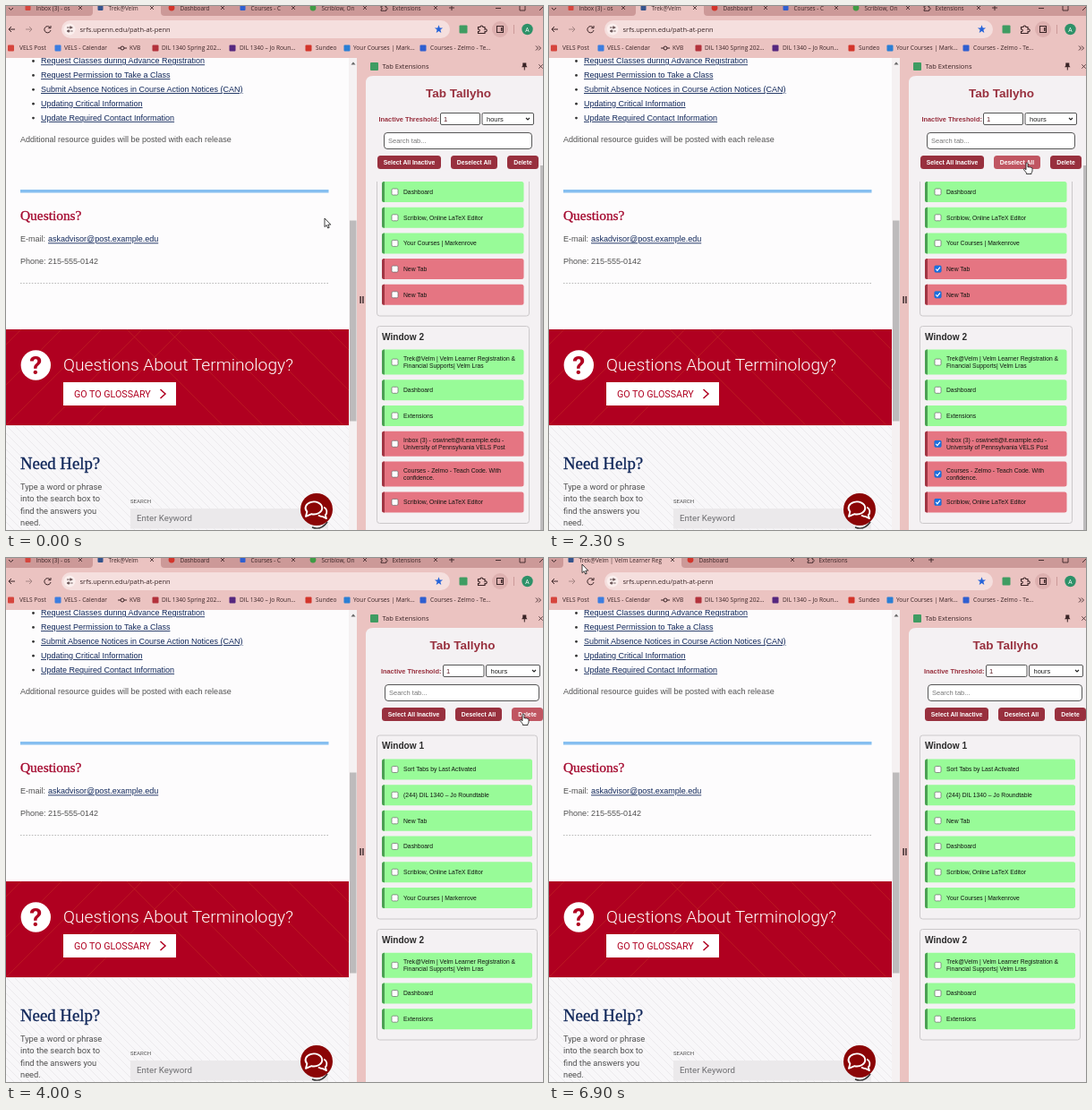
An HTML page that plays this animation: 600 by 585 pixels, repeating every 7000 ms.

```html
<!DOCTYPE html>
<html lang="en">
<head>
<meta charset="utf-8">
<title>Tab manager demo</title>
<style>
  html, body { margin: 0; width: 100%; height: 100%; overflow: hidden; background: #ebc3c1; }
  svg { display: block; width: 100%; height: 100%; }
  text { font-family: "Liberation Sans", Arial, sans-serif; white-space: pre; fill: currentColor; }
  .ui { font-family: "Open Sans", "Noto Sans", sans-serif; }
  .site { font-family: Roboto, sans-serif; }
  .light { font-weight: 300; }
  .serif { font-family: "Liberation Serif", Times, serif; stroke: currentColor; stroke-width: .3; }
  .b { font-weight: 700; }
  .mid { text-anchor: middle; }
  .link { text-decoration: underline; }
</style>
</head>
<body>
<svg id="stage" viewBox="0 0 600 585"></svg>
<script>
const LOOP = 7000, STEP = 100;
const PINK = '#ebc3c1', INK = '#3a2426', RED = '#b00020', WINE = '#98303e', HOVER = '#c05662';
const GREEN = '#98fb98', ROSE = '#e57582', NAVY = '#10275a', GREY = '#505050';

const rect = (x, y, w, h, fill, more = '') =>
  `<rect x="${x}" y="${y}" width="${w}" height="${h}" fill="${fill}" ${more}/>`;
const text = (x, y, size, str, color, cls = '') =>
  `<text x="${x}" y="${y}" font-size="${size}" color="${color}" class="${cls}">${str}</text>`;
const dot = (x, y, r, fill, more = '') =>
  `<circle cx="${x}" cy="${y}" r="${r}" fill="${fill}" ${more}/>`;
const line = (d, stroke, w = 1, more = '') =>
  `<path d="${d}" fill="none" stroke="${stroke}" stroke-width="${w}" ${more}/>`;
const square = (x, y, s, fill) => rect(x - s / 2, y - s / 2, s, s, fill, 'rx="1"');
const cross = (x, y, s = 2) =>
  line(`M${x - s} ${y - s}l${2 * s} ${2 * s}m0 ${-2 * s}l${-2 * s} ${2 * s}`, INK, .8);
const puzzle = (x, y, s) =>
  `<g transform="translate(${x} ${y}) scale(${s})">` +
  line('M-4 -2.5H-1.6A1.5 1.5 0 1 1 1.4 -2.5H3.5V0A1.5 1.5 0 1 1 3.5 2.6V4.5H-4V2.6A1.4 1.4 0 1 0 -4 -.1Z', INK, 1.1) + '</g>';

// Browser chrome

const TABS = [
  { label: 'Inbox (3) - os', icon: '#d6453d', a: [16, 83] },
  { label: 'Trek@Velm', full: 'Trek@Velm | Velm Learner Reg', icon: '#34548c', a: [97, 163], b: [16, 138], active: true },
  { label: 'Dashboard', icon: '#d3352b', a: [177, 242], b: [150, 272], round: true },
  { label: 'Courses - C', icon: '#2f5fd0', a: [256, 321] },
  { label: 'Scriblow, On', icon: '#3f9b45', a: [335, 401], round: true },
  { label: 'Extensions', a: [414, 480], b: [284, 406] }
];

function tabStrip(p) {
  const mix = (t, i) => t.a[i] + ((t.b || t.a)[i] - t.a[i]) * p;
  let s = rect(0, 0, 600, 11, '#cc9998');
  for (const t of TABS) {
    if (p && !t.b) continue;
    const x = mix(t, 0), end = mix(t, 1);
    if (t.active) s += `<path d="M${x - 4} 11q4 0 4 -4v-8H${end + 10}v8q0 4 4 4z" fill="${PINK}"/>`;
    s += !t.icon ? puzzle(x + 8, 2, .75)
      : t.round ? dot(x + 8, 2, 3.4, t.icon) : square(x + 8.5, 2, 6, t.icon);
    s += text(x + 17.5, 4.7, 6.4, p > .5 && t.full || t.label, INK, 'ui') + cross(end, 2);
  }
  const plus = 498 - 71 * p;
  return s + line(`M${plus - 3} 2h6m-3 -3v6`, INK, .9) + line('M3 2l2.5 2.5 2.5 -2.5', INK, 1) +
    line('M547 2.5h6', INK, .9) + line('M574 -1v6h6v-6', INK, .9) + line('M596 5l4 -4', INK, .9);
}

function toolbar() {
  const marks = [
    [5.5, 15, '#d6453d', 'VELS Post'], [58, 65, '#3b7de0', 'VELS - Calendar'],
    [130, 138, '', 'KVB'], [167, 174, '#b3323c', 'DIL 1340 Spring 202...'],
    [253, 261, '#55277f', 'DIL 1340 – Jo Roun...'], [338, 346, '#d3352b', 'Sundeo'],
    [381, 388, '#2b7fd4', 'Your Courses | Mark...'], [466, 474, '#2f5fd0', 'Courses - Zelmo - Te...']
  ];
  let s = rect(0, 11, 600, 47, PINK) +
    line('M10 26H3m3 -3l-3 3 3 3', INK, 1) + line('M22 26h7m-3 -3l3 3 -3 3', '#a58584', 1) +
    line('M49.3 24A3.6 3.6 0 1 0 50 27M50 22v2.7h-2.7', INK, 1) +
    rect(62, 16, 434, 20, '#f5dfde', 'rx="10"') + dot(71, 26, 6.5, '#fbefee') +
    line('M68 24h2m2 0h2.5M68 28h2.5m2 0h2', INK, .8) +
    dot(72, 24, 1.1, 'none', `stroke="${INK}" stroke-width=".8"`) +
    dot(70, 28, 1.1, 'none', `stroke="${INK}" stroke-width=".8"`) +
    text(82.5, 28.6, 7.5, 'srfs.upenn.edu/path-at-penn', INK, 'ui');
  let star = '';
  for (let i = 0; i < 10; i++) {
    const r = i % 2 ? 2 : 4.8, a = i * Math.PI / 5;
    star += `${(483.5 + r * Math.sin(a)).toFixed(1)},${(26 - r * Math.cos(a)).toFixed(1)} `;
  }
  s += `<polygon points="${star}" fill="#2563d9"/>` + square(511, 26, 9, '#3f9c62') + puzzle(531.5, 26, 1) +
    dot(552, 26, 9, '#ddb0af') + rect(548.5, 22.5, 7, 7, 'none', `stroke="${INK}"`) + rect(553, 24, 1.5, 4, INK) +
    rect(567, 21, 1, 10, '#c99') + dot(582.5, 26, 6.2, '#2d9168') +
    text(582.5, 28.5, 6.8, 'A', '#fff', 'ui mid');
  for (const [ix, tx, color, label] of marks) {
    s += color ? square(ix, 47, 7, color)
      : dot(ix, 47, 2, 'none', `stroke="${INK}"`) + line('M125 47h3m4 0h3', INK, 1);
    s += text(tx, 49.3, 6.6, label, INK, 'ui');
  }
  return s + line('M592 44.5l2.5 2.5 -2.5 2.5m3 -5l2.5 2.5 -2.5 2.5', INK, .9);
}

// Web page

function page() {
  const links = ['Request Classes during Advance Registration', 'Request Permission to Take a Class',
    'Submit Absence Notices in Course Action Notices (CAN)', 'Updating Critical Information',
    'Update Required Contact Information'];
  let s = rect(0, 58, 383, 527, '#fdfcfd');
  links.forEach((str, i) => {
    const y = 64.3 + i * 15.9;
    s += dot(30.5, y - 2.8, 1.4, '#333') + text(39, y, 9, str, NAVY, 'link');
  });
  s += text(16, 152.4, 9, 'Additional resource guides will be posted with each release', GREY) +
    rect(16, 205, 344.5, 3.5, '#86bff0') +
    text(16, 238.8, 15.4, 'Questions?', '#a3062c', 'serif') +
    text(16, 263.4, 9, 'E-mail:', GREY) +
    text(47, 263.4, 9, 'askadvisor@post.example.edu', NAVY, 'link') +
    text(16, 288.4, 9, 'Phone: 215-555-0142', GREY) +
    line('M16 309.5H360', '#aaa', .8, 'stroke-dasharray="1.6 1.6"');

  // banner
  let rays = '';
  for (let x = -90; x < 400; x += 45) rays += x < 130 ? `M${x + 107} 361l-107 107` : `M${x} 361l107 107`;
  s += `<g clip-path="url(#pageClip)">${rect(0, 361, 383, 107.5, RED)}${line(rays, '#cf4a22', .6, 'opacity=".5"')}</g>` +
    dot(33.3, 401, 16.7, '#fff') + text(33.3, 411, 28, '?', RED, 'site b mid') +
    text(64, 407, 19.2, 'Questions About Terminology?', '#fff', 'site light') +
    rect(64, 420, 126, 26, '#fff') + text(76, 436.8, 10.7, 'GO TO GLOSSARY', RED, 'site') +
    line('M172.5 428l5.5 5 -5.5 5', RED, 1.5);

  // help search
  s += rect(0, 468.5, 383, 116.5, '#f8f7f9') + rect(0, 468.5, 383, 116.5, 'url(#hatch)') +
    text(16, 516.7, 18.8, 'Need Help?', NAVY, 'serif');
  ['Type a word or phrase', 'into the search box to', 'find the answers you', 'need.'].forEach((str, i) => {
    s += text(16, 540 + i * 13.4, 9.3, str, GREY, 'site');
  });
  s += text(139, 554.5, 6.1, 'SEARCH', GREY, 'site') + rect(139, 561, 221, 22.5, '#ebe9eb') +
    text(146, 575.1, 9.7, 'Enter Keyword', '#6d6d70', 'site') +
    line('M342 582q10 4 17 -6', '#333', 1.4) + dot(347, 562, 18, '#8b0506') +
    line('M349 568.5a8.3 6.2 0 0 0 5 1.6l4 2 -1.2 -3.6a5.6 5.6 0 0 0 -1.6 -9', '#fff', 1.8, 'stroke-linejoin="round"') +
    line('M336.4 564.6a9.3 7 0 1 1 5 2.6l-6.4 2.6z', '#fff', 1.9, 'stroke-linejoin="round"');

  // scrollbar and splitter
  return s + rect(383, 58, 9, 527, '#f5f1f2') + '<path d="M385.5 65.5h5l-2.5 -3z" fill="#666"/>' +
    rect(384, 239.5, 7.5, 224, '#bdbbbc') + rect(392, 58, 208, 527, PINK) +
    rect(395.3, 324, 1.6, 8, '#4b3738') + rect(398.1, 324, 1.6, 8, '#4b3738');
}

// Side panel

const BEFORE = {
  mid: 505.5, label: 416.5, num: [485.5, 44], unit: [532, 57.5], search: [422.5, 165], btn: [415, 497, 560],
  rowW: 158.5, boxW: 171,
  boxes: [[196, 346, ''], [357.5, 577.5, 'Window 2']],
  rows: [[207.5, 'Dashboard'], [236.3, 'Scriblow, Online LaTeX Editor'], [264.9, 'Your Courses | Markenrove'],
    [293.6, 'New Tab', 1], [322.3, 'New Tab', 1],
    [397.6, 'Trek@Velm | Velm Learner Registration &amp;/Financial Supports| Velm Lras'], [428.8, 'Dashboard'], [457.5, 'Extensions'],
    [488.8, 'Inbox (3) - oswinett@it.example.edu -/University of Pennsylvania VELS Post', 1],
    [522.6, 'Courses - Zelmo - Teach Code. With/confidence.', 1], [553.9, 'Scriblow, Online LaTeX Editor', 1]]
};
const AFTER = {
  mid: 510, label: 419, num: [488.5, 45.5], unit: [536.5, 60], search: [423.5, 172], btn: [420, 502, 565],
  rowW: 168, boxW: 180,
  boxes: [[198, 403, 'Window 1'], [414.5, 538, 'Window 2']],
  rows: [[236, 'Sort Tabs by Last Activated'], [264.7, '(244) DIL 1340 – Jo Roundtable'], [293.3, 'New Tab'],
    [322, 'Dashboard'], [350.7, 'Scriblow, Online LaTeX Editor'], [379.4, 'Your Courses | Markenrove'],
    [454.8, 'Trek@Velm | Velm Learner Registration &amp;/Financial Supports| Velm Lras'], [486, 'Dashboard'], [514.7, 'Extensions']]
};
const BUTTONS = [['Select All Inactive', 71], ['Deselect All', 52], ['Delete', 35]];

function row(y, str, stale, w) {
  const lines = str.split('/'), h = lines.length > 1 ? 28 : 23;
  const base = lines.length > 1 ? y - 1.7 : y + 2.2;
  let s = rect(420, y - h / 2, w, h, stale ? ROSE : GREEN, 'rx="2.5"') +
    `<path d="M423 ${y - h / 2}v${h}h-.5q-2.5 0 -2.5 -2.5v${5 - h}q0 -2.5 2.5 -2.5z" fill="${stale ? '#a03543' : '#4ba053'}"/>` +
    rect(431, y - 3.5, 7, 7, '#fff', 'rx="1.4" stroke="#666" stroke-width=".7"');
  if (stale) s += `<g class="tick">${rect(430.6, y - 3.9, 7.8, 7.8, '#1a6fe0', 'rx="1.4"')}${line(`M432.3 ${y}l1.6 1.8 3 -3.8`, '#fff', 1.2)}</g>`;
  return s + lines.map((part, i) => text(444, base + i * 7.7, 6.75, part, '#101510')).join('');
}

function panel(o, id) {
  const field = ([x, w], y, h, r, more = '') =>
    rect(x, y, w, h, '#fff', `rx="${r}" stroke="#444" stroke-width=".9" ${more}`);
  const arrow = o.unit[0] + o.unit[1] - 6.5;
  let s = text(o.mid, 102, 13.5, 'Tab Tallyho', WINE, 'b mid') +
    text(o.label, 128.6, 7.35, 'Inactive Threshold:', WINE, 'b') +
    field(o.num, 119.5, 13, 1.5) + text(o.num[0] + 3.5, 128.7, 7.5, '1', '#5a1620') +
    field(o.unit, 119.5, 13, 1.5, 'class="unit"') + text(o.unit[0] + 5, 128.7, 7.5, 'hours', '#222') +
    line(`M${arrow - 2} 125l2 2 2 -2`, '#222', 1.1) +
    field(o.search, 141.5, 18, 3.5) + text(o.search[0] + 4.5, 153.3, 7.5, 'Search tab...', '#777');
  BUTTONS.forEach(([name, w], i) => {
    s += rect(o.btn[i], 167, w, 15, WINE, 'rx="3.5" class="btn"') +
      text(o.btn[i] + w / 2, 177, 6.8, name, '#fff', 'b mid');
  });
  for (const [top, bottom, title] of o.boxes) {
    s += title
      ? rect(414.5, top, o.boxW - 1, bottom - top, 'none', 'rx="3" stroke="#cbc8ca"') + text(420, top + 15, 10.1, title, '#2b2b2b', 'b')
      : line(`M414.5 ${top}V${bottom - 3}q0 3 3 3h${o.boxW - 7}q3 0 3 -3V${top}`, '#cbc8ca');
  }
  for (const [y, str, stale] of o.rows) s += row(y, str, stale, o.rowW);
  if (o === BEFORE) s += rect(597, 178, 3, 407, '#bdbbbc');
  return `<g id="${id}">${s}</g>`;
}

const panelFrame = () => square(411.5, 67.5, 9, '#3f9c62') +
  text(420.5, 70.4, 7.5, 'Tab Extensions', INK, 'ui') +
  `<path d="M577.3 63.5h4v3l1.2 1.7h-6.4l1.2 -1.7z" fill="${INK}"/>` + line('M579.3 68v3.5', INK, 1) + cross(597.5, 67.5, 2.2) +
  '<path d="M402 585V86q0 -8 8 -8H600V585z" fill="#f4f1f3"/>';

const cursors = `<g id="arrow"><path d="M0 0V9.6L2.2 7.6 3.7 11 5.2 10.3 3.8 7.1H6.8Z" fill="#fff" stroke="#111" stroke-width=".8"/></g>
  <g id="hand"><path d="M-1 1a1 1 0 0 1 2 0V5q.9 -.8 1.8 .1 1 -.6 1.7 .3 1.5 -.3 1.5 1.3V9q0 1.3 -1 2.2V12.5H-.6V11.2L-3.4 7.8q-.3 -1.4 1 -1.2L-1 7.8Z" fill="#fff" stroke="#111" stroke-width=".8" stroke-linejoin="round"/></g>`;

const stage = document.getElementById('stage');
stage.innerHTML = `<defs>
  <clipPath id="pageClip">${rect(0, 361, 383, 107.5, '#000')}</clipPath>
  <pattern id="hatch" width="9" height="9" patternUnits="userSpaceOnUse">${line('M-1 -1L10 10M-1 8l2 2M8 -1l2 2', '#e6e4e8', .7)}</pattern>
  </defs>` + page() + toolbar() + '<g id="tabs"></g>' + panelFrame() +
  panel(BEFORE, 'before') + panel(AFTER, 'after') + cursors;

// Motion: [ms, x, y] of the pointer tip
const PATH = [[0, 356, 237], [400, 562, 127], [500, 562, 127], [800, 442, 174.3], [1400, 442, 174.3], [2200, 534, 175],
  [2500, 534, 175], [3000, 576, 178], [3600, 578, 174], [4300, 578, 174], [5100, 387, 148], [6900, 37, 7], [LOOP, 37, 7]];
const SELECT_AT = 1100, DELETE_AT = 3700, CLOSE_AT = 4100, CLOSE_MS = 200;
const FOCUS = [400, SELECT_AT];

function pointer(t) {
  const i = PATH.findIndex(k => k[0] > t);
  const [t0, x0, y0] = PATH[i - 1], [t1, x1, y1] = PATH[i];
  const u = (t - t0) / (t1 - t0), e = u * u * (3 - 2 * u);
  return [x0 + (x1 - x0) * e, y0 + (y1 - y0) * e];
}

const el = id => document.getElementById(id);
const show = (node, on) => node.setAttribute('visibility', on ? 'inherit' : 'hidden');
const ticks = stage.querySelectorAll('.tick');
const unit = stage.querySelector('#before .unit');
const buttons = { before: stage.querySelectorAll('#before .btn'), after: stage.querySelectorAll('#after .btn') };
let last = -1, lastTabs = -1;

function draw(t) {
  const [x, y] = pointer(t), deleted = t >= DELETE_AT;
  const state = deleted ? 'after' : 'before', layout = deleted ? AFTER : BEFORE;
  show(el('before'), !deleted);
  show(el('after'), deleted);
  ticks.forEach(n => show(n, t >= SELECT_AT));

  const focused = t >= FOCUS[0] && t < FOCUS[1];
  unit.setAttribute('stroke', focused ? '#101010' : '#444');
  unit.setAttribute('stroke-width', focused ? 1.7 : .9);

  let over = false;
  buttons[state].forEach((b, i) => {
    const hit = y >= 167 && y < 182 && x >= layout.btn[i] && x < layout.btn[i] + BUTTONS[i][1];
    b.setAttribute('fill', hit ? HOVER : WINE);
    over = over || hit;
  });
  for (const id of ['arrow', 'hand']) {
    show(el(id), (id === 'hand') === over);
    el(id).setAttribute('transform', `translate(${x.toFixed(1)} ${y.toFixed(1)})`);
  }

  const p = Math.min(1, Math.max(0, (t - CLOSE_AT + STEP) / CLOSE_MS));
  if (p !== lastTabs) el('tabs').innerHTML = tabStrip(lastTabs = p);
}

const start = performance.now();
function tick() {
  const t = Math.floor(((performance.now() - start) % LOOP) / STEP) * STEP;
  if (t !== last) draw(last = t);
  requestAnimationFrame(tick);
}
tick();
</script>
</body>
</html>
```
